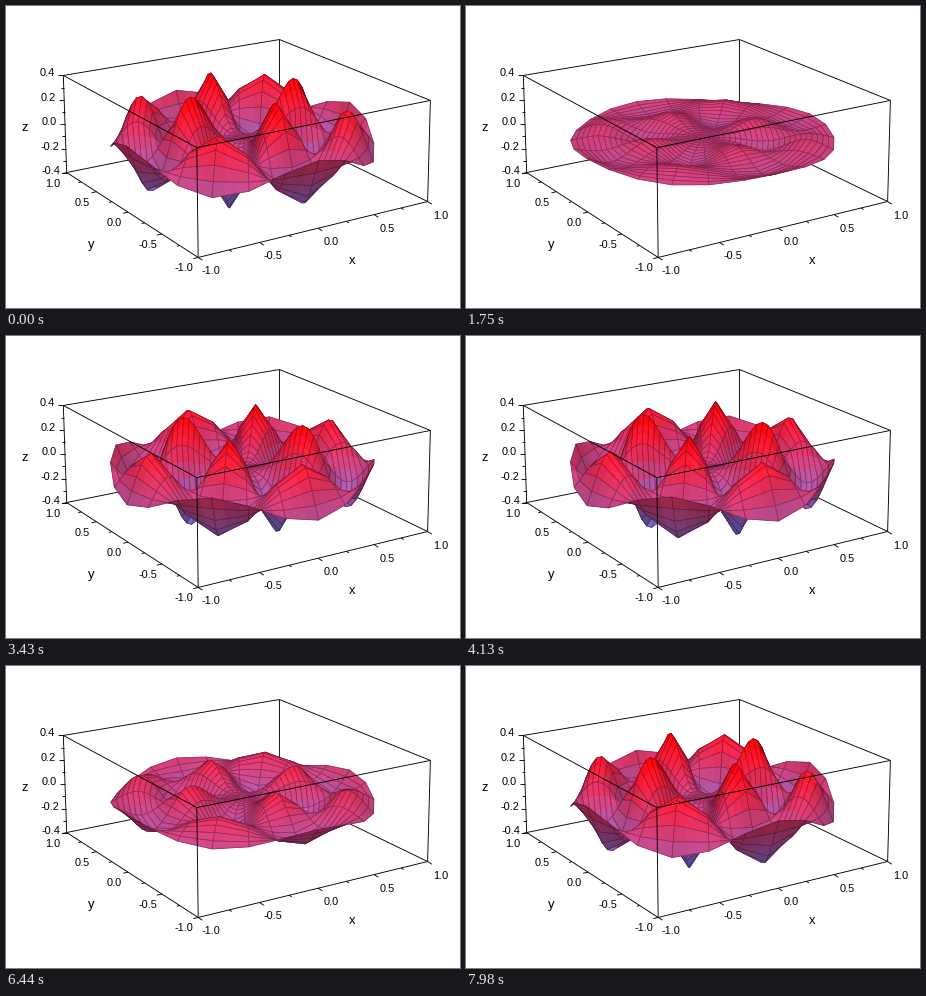
These frames come from a looping animation (454x302 px, 8000 ms). A matplotlib script:

```python
import itertools

import matplotlib.pyplot as plt
import numpy as np
from matplotlib.animation import FuncAnimation
from matplotlib.collections import LineCollection, PolyCollection

WIDTH, HEIGHT, DPI = 454, 302, 64
PX = 72 / DPI
LOOP_MS, INTERVAL = 8000, 40
PERIOD_MS = 7840
ORDER, WAVENUMBER = 4, 11.6
TOP = 0.4
STRIPS = 3

RED = np.array([1.0, 0.0, 0.0])
BLUE = np.array([0.4, 0.45, 0.85])
LIGHT = np.array([-0.35, -0.45, 0.82])
MESH_LINE = (0.15, 0, 0.1, 0.42)

# Box corners in data space and where they land on the stage.
CORNERS = {
    (-1, 1, TOP): (57, 69), (1, 1, TOP): (273, 33),
    (1, -1, TOP): (424, 94), (-1, -1, TOP): (190, 141),
    (-1, 1, -TOP): (60, 166), (1, -1, -TOP): (421, 195),
    (-1, -1, -TOP): (192, 251),
}


def fit_camera(corners):
    """Perspective matrix that best maps the corners to the stage."""
    rows = []
    for point, (u, v) in corners.items():
        p, zero = np.array([*point, 1.0]), np.zeros(4)
        rows.append(np.concatenate([p, zero, -u / 100 * p]))
        rows.append(np.concatenate([zero, p, -v / 100 * p]))
    camera = np.linalg.svd(np.array(rows))[2][-1].reshape(3, 4)
    camera[:2] *= 100
    return camera * np.sign(camera[2, 3])


CAMERA = fit_camera(CORNERS)
EYE = -np.linalg.solve(CAMERA[:, :3], CAMERA[:, 3])


def project(points):
    """Stage coordinates and depth of data points."""
    h = np.asarray(points, float) @ CAMERA[:, :3].T + CAMERA[:, 3]
    return h[..., :2] / h[..., 2:], h[..., 2]


def bessel(order, x):
    tau = (np.arange(200) + 0.5) * np.pi / 200
    return np.cos(order * tau - np.multiply.outer(x, np.sin(tau))).mean(-1)


r, theta = np.meshgrid(np.linspace(0, 1, 25), np.linspace(0, 2 * np.pi, 25))
grid_x, grid_y = r * np.cos(theta), r * np.sin(theta)
mode = bessel(ORDER, WAVENUMBER * r) * np.cos(ORDER * theta)


def unit(vectors):
    return vectors / (np.linalg.norm(vectors, axis=-1, keepdims=True) + 1e-12)


def vertex_normals(p):
    """Smooth normals, wrapping around the disc."""
    around = np.vstack([p[-2:-1], p, p[1:2]])
    across = around[2:] - around[:-2]
    normal = unit(np.cross(np.gradient(p, axis=1), across))
    normal[:, 0] = (0, 0, 1)
    return normal


def cells(grid):
    """Four corner values of every grid cell."""
    corners = (grid[:-1, :-1], grid[1:, :-1], grid[1:, 1:], grid[:-1, 1:])
    return np.stack(corners, axis=2).reshape(-1, 4, 3)


def slice_cells(quads, start, end):
    """Part of each cell between two fractions of its angle."""
    a, b, c, d = np.moveaxis(quads, 1, 0)
    return np.stack([a + start * (b - a), a + end * (b - a),
                     d + end * (c - d), d + start * (c - d)], axis=1)


def paint(quads, normals):
    normal = unit(normals.mean(1))
    center = quads.mean(1)
    facing = np.sign(np.sum(normal * (EYE - center), axis=1))
    shade = 0.72 + 0.5 * np.clip(facing * (normal @ LIGHT), 0, 1)
    level = (center[:, 2:] / TOP + 1) / 2
    color = np.clip((BLUE + level * (RED - BLUE)) * shade[:, None], 0, 1)
    return np.hstack([color, np.ones((len(color), 1))])


def surface(amplitude):
    """Cells back to front, each as shaded strips and then its outline."""
    p = np.stack([grid_x, grid_y, amplitude * mode], axis=-1)
    quads, normals = cells(p), cells(vertex_normals(p))
    order = np.argsort(-project(quads.mean(1))[1])
    quads, normals = quads[order], normals[order]
    shapes, faces, edges = [], [], []
    for k in range(STRIPS):
        span = k / STRIPS, (k + 1) / STRIPS
        strip = slice_cells(quads, *span)
        color = paint(strip, slice_cells(normals, *span))
        shapes.append(strip)
        faces.append(color)
        edges.append(color)
    shapes.append(quads)
    faces.append(np.zeros((len(quads), 4)))
    edges.append(np.tile(MESH_LINE, (len(quads), 1)))
    return (project(np.stack(shapes, 1).reshape(-1, 4, 3))[0],
            np.stack(faces, 1).reshape(-1, 4),
            np.stack(edges, 1).reshape(-1, 4))


fig = plt.figure(figsize=(WIDTH / DPI, HEIGHT / DPI), dpi=DPI, facecolor="white")
ax = fig.add_axes([0, 0, 1, 1])
ax.set_xlim(-0.5, WIDTH - 0.5)
ax.set_ylim(HEIGHT - 0.5, -0.5)
ax.axis("off")


def draw_lines(segments, zorder):
    ax.add_collection(LineCollection(segments, colors="black",
                                     linewidths=0.9 * PX, zorder=zorder))


def draw_box():
    front, back = [], []
    corners = list(itertools.product((-1, 1), (-1, 1), (-TOP, TOP)))
    for a, b in itertools.combinations(corners, 2):
        if sum(m != n for m, n in zip(a, b)) == 1:
            hidden = (1, 1, -TOP) in (a, b)
            (back if hidden else front).append(project([a, b])[0])
    draw_lines(back, 1)
    draw_lines(front, 3)


def label(x, y, text, size=11):
    ax.text(x, y, text, fontsize=size * PX, family="Liberation Sans",
            ha="center", va="center_baseline", zorder=4)


def draw_axis(place, limit, major, tick, offset):
    """Ticks with one minor step between majors, and numbers."""
    count = round(2 * limit / major) * 2
    segments = []
    for i in range(count + 1):
        value = -limit + i * major / 2
        start = project(place(value))[0]
        length = 3 if i % 2 else 5
        segments.append([start, start + length * np.array(tick)])
        if i % 2 == 0:
            x, y = start + offset
            label(x, y, f"{value + 0.0:.1f}".replace("-0.0", "0.0"))
    draw_lines(segments, 3)


draw_box()
draw_axis(lambda v: (v, -1, -TOP), 1, 0.5, (0.84, 0.54), (13, 13))
draw_axis(lambda v: (-1, v, -TOP), 1, 0.5, (-0.97, 0.24), (-14, 10))
draw_axis(lambda v: (-1, 1, v), TOP, 0.2, (-1, 0), (-16, -3))
for x, y, name in ((346, 253, "x"), (85, 237, "y"), (18, 120, "z")):
    label(x, y, name, 13)

verts, faces, edges = surface(1)
mesh = PolyCollection(verts, facecolors=faces, edgecolors=edges,
                      linewidths=0.7 * PX, zorder=2)
ax.add_collection(mesh, autolim=False)

# Poses are held for 210 ms, every sixteenth one for 280 ms.
starts = [0]
while starts[-1] < LOOP_MS:
    starts.append(starts[-1] + (280 if (len(starts) - 1) % 16 == 0 else 210))


def update(i):
    now = i * INTERVAL + INTERVAL - 10
    held = max(s for s in starts if s <= now)
    verts, faces, edges = surface(np.cos(2 * np.pi * held / PERIOD_MS))
    mesh.set_verts(verts)
    mesh.set_facecolor(faces)
    mesh.set_edgecolor(edges)
    return (mesh,)


animation = FuncAnimation(fig, update, frames=LOOP_MS // INTERVAL,
                          interval=INTERVAL, repeat=True, repeat_delay=0)
plt.show()
```
